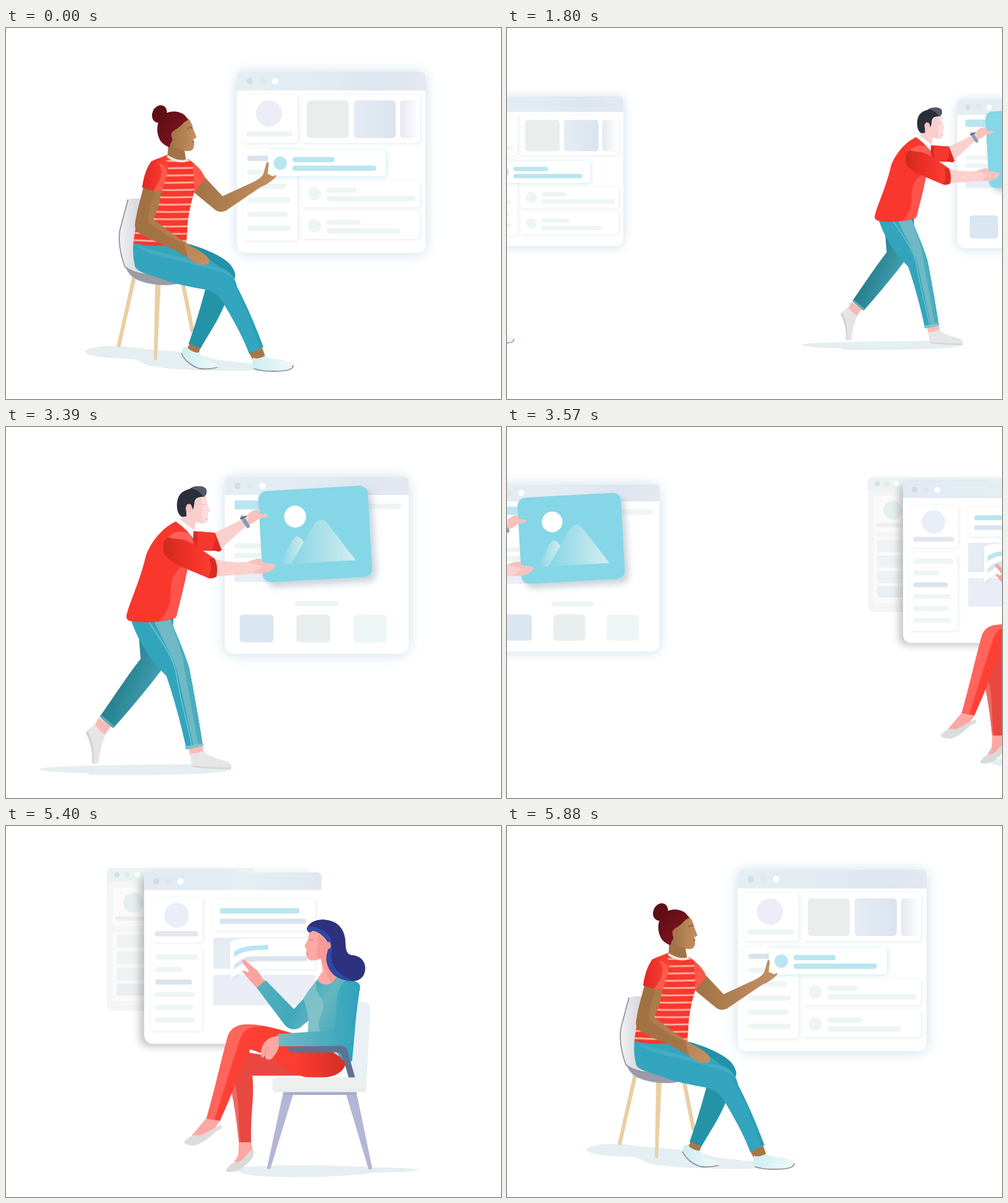
An HTML page that plays this animation: 800 by 600 pixels, repeating every 5.97 s.

```html
<!DOCTYPE html>
<html lang="en">
<head>
<meta charset="utf-8">
<title>Builders carousel</title>
<style>
html, body { margin: 0; width: 100%; height: 100%; overflow: hidden; background: #fff; }
svg { display: block; width: 800px; height: 600px; }
.bar { height: 8.5px; rx: 4px; fill: #edf6f4; }
.cyan { fill: #b8e6f0; }
.blue { fill: #d9e4ef; }
.card { fill: #fff; rx: 5px; filter: url(#soft); }
.tile { rx: 6px; }
.floor { fill: #e5eef1; }
.line { fill: none; stroke-linecap: round; stroke-linejoin: round; }
</style>
</head>
<body>
<svg viewBox="0 0 800 600">
<defs>
  <filter id="glow" x="-20%" y="-20%" width="140%" height="140%"><feDropShadow dx="0" dy="1" stdDeviation="11" flood-color="#c3d9e8" flood-opacity=".85"/></filter>
  <filter id="soft" x="-20%" y="-30%" width="140%" height="160%"><feDropShadow dx="1" dy="1" stdDeviation="2.4" flood-color="#8a9aa8" flood-opacity=".24"/></filter>
  <filter id="lift" x="-20%" y="-40%" width="140%" height="180%"><feDropShadow dx="1" dy="1" stdDeviation="3" flood-color="#7fd4e0" flood-opacity=".5"/></filter>
  <filter id="drop" x="-20%" y="-20%" width="150%" height="150%"><feDropShadow dx="7" dy="8" stdDeviation="6" flood-color="#6e8a9c" flood-opacity=".38"/></filter>
  <filter id="blur" x="-20%" y="-20%" width="140%" height="140%"><feGaussianBlur stdDeviation="7"/></filter>
  <linearGradient id="head"><stop stop-color="#e5eef2"/><stop offset=".5" stop-color="#e2ebf3"/><stop offset=".75" stop-color="#dde6f0"/><stop offset="1" stop-color="#e5e8f1"/></linearGradient>
  <linearGradient id="head3"><stop stop-color="#e2e9f4"/><stop offset=".6" stop-color="#e5eef3"/><stop offset="1" stop-color="#e0e7f1"/></linearGradient>
  <linearGradient id="tileB"><stop stop-color="#e6ecf4"/><stop offset="1" stop-color="#dae4ef"/></linearGradient>
  <linearGradient id="fade"><stop stop-color="#e5e8f0"/><stop offset="1" stop-color="#fff"/></linearGradient>
  <linearGradient id="hair1" x2="1" y2="1"><stop stop-color="#5c0c15"/><stop offset="1" stop-color="#861722"/></linearGradient>
  <linearGradient id="skin"><stop stop-color="#a17246"/><stop offset=".45" stop-color="#b18052"/><stop offset="1" stop-color="#c59165"/></linearGradient>
  <linearGradient id="hand" x2="1" y2="1"><stop stop-color="#a97849"/><stop offset=".6" stop-color="#b18052"/><stop offset="1" stop-color="#c59165"/></linearGradient>
  <linearGradient id="chair"><stop stop-color="#f2f2f4"/><stop offset=".5" stop-color="#d9d9de"/><stop offset="1" stop-color="#f0f0f3"/></linearGradient>
  <linearGradient id="sleeve"><stop stop-color="#e3261e"/><stop offset="1" stop-color="#ff4238"/></linearGradient>
  <linearGradient id="shoe"><stop stop-color="#cdeef2"/><stop offset="1" stop-color="#f0f8f9"/></linearGradient>
  <linearGradient id="backLeg" x1="0" y1=".3" x2=".75" y2=".75"><stop stop-color="#1f7382"/><stop offset=".5" stop-color="#2b8594"/><stop offset="1" stop-color="#44a4b4"/></linearGradient>
  <linearGradient id="knit"><stop stop-color="#cf2a20"/><stop offset=".4" stop-color="#ec3026"/><stop offset="1" stop-color="#ff4036"/></linearGradient>
  <linearGradient id="peak"><stop stop-color="#85d6e6"/><stop offset=".6" stop-color="#b5e3ea"/><stop offset="1" stop-color="#d2eef1"/></linearGradient>
  <linearGradient id="teal" gradientUnits="userSpaceOnUse" x1="412" x2="580" y1="250" y2="350"><stop stop-color="#55b1bd"/><stop offset=".4" stop-color="#3fa9bb"/><stop offset=".58" stop-color="#64b6bf"/><stop offset="1" stop-color="#2fa3bc"/></linearGradient>
  <linearGradient id="arm3"><stop stop-color="#72b9bf"/><stop offset="1" stop-color="#2fa3bc"/></linearGradient>
  <linearGradient id="thigh"><stop stop-color="#ff4338"/><stop offset=".65" stop-color="#fb3c31"/><stop offset="1" stop-color="#d32e25"/></linearGradient>
  <pattern id="stripes" patternUnits="userSpaceOnUse" x="200" y="208" width="130" height="11.8"><path d="M0 5Q65 9 130 5" class="line" stroke="#ffb9ab" stroke-width="2.8"/></pattern>
</defs>

<g class="scene">
  <g filter="url(#glow)">
    <path d="M373 101V79Q373 71 381 71H670Q678 71 678 79V348Q678 364 662 364H389Q373 364 373 348z" fill="#fff"/>
  </g>
  <path d="M373 101V79Q373 71 381 71H670Q678 71 678 79V101z" fill="url(#head)"/>
  <circle cx="394" cy="86" r="5.3" fill="#d2dfe7"/><circle cx="414.5" cy="86" r="5.3" fill="#e0e8ee"/><circle cx="435" cy="86" r="5.3" fill="#fff"/>
  <rect class="card" x="383" y="108" width="88" height="78"/>
  <circle cx="425" cy="138.5" r="21.3" fill="#ecedf7"/>
  <rect class="bar" x="388" y="167" width="75"/>
  <rect class="card" x="477" y="108" width="192" height="78"/>
  <rect class="tile" x="486" y="117" width="68" height="61" fill="#e9eeec"/>
  <rect class="tile" x="562" y="117" width="68" height="61" fill="url(#tileB)"/>
  <path d="M668 117H643Q637 117 637 123V172Q637 178 643 178H668z" fill="url(#fade)"/>
  <rect class="card" x="383" y="195" width="88" height="149"/>
  <rect class="bar blue" x="390" y="206.5" width="40"/>
  <rect class="bar" x="390" y="229" width="40"/><rect class="bar" x="390" y="251.5" width="63"/>
  <rect class="bar" x="390" y="274" width="69"/><rect class="bar" x="390" y="297" width="65"/><rect class="bar" x="390" y="319.5" width="69"/>
  <rect class="card" x="477" y="247" width="192" height="43"/>
  <rect class="card" x="477" y="297" width="192" height="44"/>
  <g fill="#edf6f4"><circle cx="498.5" cy="268" r="10.7"/><circle cx="498.5" cy="320" r="10.7"/></g>
  <rect class="bar" x="518" y="258" width="48"/><rect class="bar" x="518" y="272" width="144"/>
  <rect class="bar" x="518" y="310" width="55"/><rect class="bar" x="518" y="324" width="119"/>
  <rect x="423" y="197" width="191" height="43" rx="5" fill="#fff" filter="url(#lift)"/>
  <circle class="cyan" cx="443.3" cy="218.5" r="10.8"/>
  <rect class="bar cyan" x="463" y="208.5" width="68"/><rect class="bar cyan" x="463" y="222.5" width="135"/>

  <path class="floor" d="M128 523C135 513 180 512 215 518C245 522 290 520 330 534C370 542 420 542 440 549C430 557 300 556 250 549C215 545 222 537 200 535C160 534 130 531 128 523z"/>
  <g fill="#e9cfa2">
    <path d="M204 402L210 405L185 515Q182 518 179 514z"/><path d="M241 414H250L244 536Q241 539 239 535z"/><path d="M283 414L290 416L304 488L299 494z"/>
  </g>
  <path d="M193 386C215 398 255 394 288 410C275 417 245 418 222 411C207 406 198 400 193 386z" fill="#9b9ba7"/>
  <path d="M196 279Q198 276 203 276L226 275L222 360L240 398C222 399 207 397 193 387C184 365 181 345 184 329z" fill="url(#chair)"/>
  <path class="line" d="M197 278L184 327C181 347 185 366 192 386C207 397 225 400 238 398" stroke="#94959f" stroke-width="1.8"/>

  <path d="M290 348C315 354 350 368 363 383C371 394 372 401 369 406L330 396z" fill="#2391a6"/>
  <path d="M325 412L358 436L353 448C341 477 326 497 314 519L295 511C306 480 315 450 325 412z" fill="#2493a8"/>
  <path d="M297 511L314 518L311 527L292 519z" fill="#aa7646"/>
  <path d="M292 515C296 522 308 527 313 524C316 535 331 538 341 544C345 549 339 551 333 551C316 553 306 550 298 544C288 536 285 529 284 522C286 517 289 515 292 515z" fill="url(#shoe)"/>
  <path class="line" d="M284 527C289 538 300 547 312 550.500Q326 553 341 549" stroke="#8d9099" stroke-width="1.800"/>
  <path d="M393 526L414 517L419 531L399 537z" fill="#aa7646"/>
  <path d="M399 533C405 536 414 534 418 530C428 537 446 534 459 540C466 544 465 549 460 551C446 557 420 557 404 553C396 549 398 540 399 533z" fill="url(#shoe)"/>
  <path class="line" d="M401 551C418 557 447 556 459 552Q464 550 464 546" stroke="#8d9099" stroke-width="1.800"/>
  <path d="M206 346C235 354 268 354 291 349C310 362 330 373 345 386C363 392 370 403 374 420C392 455 405 487 416 516L393 527C383 500 367 471 353 448C345 433 337 427 322 423C295 418 272 414 255 407C232 398 216 397 209 387C205 372 205 358 206 346z" fill="#33a5be"/>
  <path d="M207 350C240 362 280 368 312 380C345 388 363 392 369 407C350 390 325 390 298 381C268 372 233 370 207 350z" fill="#55b3c5" opacity=".55"/>
  <path d="M360 400C384 440 398 480 410 518L416 516C405 487 391 452 374 420z" fill="#239bb6" opacity=".6"/>

  <path d="M262 190L261 210C270 219 283 219 291 212L288 196L276 184z" fill="#a27247"/>
  <path d="M293 145C298 150 301 155 302 162L308 177L303 180L304 188C304 195 301 199 295 199C284 199 273 194 267 188L266 172L278 158z" fill="url(#skin)"/>
  <path d="M301 184L305 183L303 186z" fill="#923f36"/>
  <path class="line" d="M293 163Q297 159 301 162" stroke="#8c5433" stroke-width="1.300"/>
  <path d="M294 149C290 137 273 131 258 138C244 146 242 165 247 177C250 186 257 190 264 193L269 181C266 173 269 166 276 163C284 158 286 152 294 149z" fill="url(#hair1)"/>
  <ellipse cx="248" cy="139" rx="11.5" ry="14.5" transform="rotate(25 248 139)" fill="#620e17"/>
  <ellipse cx="271" cy="173" rx="3.8" ry="6" fill="#a97548"/>

  <path d="M304 266L322 242L350 272L400 249C408 245 413 241 416 236L421 218C423 214 426 218 424 225L423 236L432 240C437 236 439 239 434 243C426 250 420 254 412 257L356 295C350 298 343 298 338 294z" fill="url(#skin)"/>
  <path d="M261 205C272 216 286 216 294 212C306 219 316 231 322 243L304 266C298 285 293 310 293 330L291 349C268 355 230 353 206 348C208 322 217 295 230 262L234 216z" fill="#f8382d"/>
  <path d="M261 205C272 216 286 216 294 212L304 222V266C298 285 293 310 293 330L291 349C268 355 230 353 206 348C208 322 217 295 230 262L248 212z" fill="url(#stripes)"/>
  <path d="M302 219C314 226 319 236 322 243L304 266V250z" fill="#ff574c"/>
  <path class="line" d="M262 208C272 215 284 217 292 214" stroke="#f0e3dc" stroke-width="4"/>
  <path d="M222 258L251 263C249 285 243 300 238 309C255 322 275 338 290 347C305 357 326 365 329 377C329 384 318 384 310 382L288 368C265 353 235 344 214 331C207 326 208 318 210 308C213 290 218 275 222 258z" fill="url(#hand)"/>
  <path d="M222 258L240 261C236 285 227 299 230 314C245 325 267 341 288 348L294 371L288 368C265 353 235 344 214 331C207 326 208 318 210 308C213 290 218 275 222 258z" fill="#9b6b3f" opacity=".6"/>
  <path d="M259 211C263 223 262 230 260 238L252 264C240 264 230 261 220 258C222 243 226 228 234 217C242 211 250 209 259 211z" fill="url(#sleeve)"/>
  <path d="M246 218C254 220 261 225 260 238L252 264L238 263C250 247 257 232 246 218z" fill="#ff5c50"/>
</g>

<g class="scene">
  <rect x="363" y="77" width="302" height="291" rx="15" fill="#fff" filter="url(#glow)"/>
  <path d="M363 107V85Q363 77 371 77H657Q665 77 665 85V107z" fill="url(#head)"/>
  <circle cx="384" cy="92" r="5.3" fill="#d2dfe7"/><circle cx="404" cy="92" r="5.3" fill="#e0e8ee"/><circle cx="425" cy="92" r="5.3" fill="#fff"/>
  <rect class="cyan" x="379" y="116" width="60" height="14.5" rx="3"/>
  <rect class="bar" x="580" y="121" width="73"/>
  <rect class="bar" x="379" y="186.5" width="60"/><rect class="bar" x="379" y="202" width="60"/>
  <rect x="379" y="235" width="60" height="15" rx="3" fill="#e9edf6"/>
  <rect class="bar" x="477.5" y="281" width="73.5"/>
  <rect class="tile" x="387.5" y="303.5" width="55.5" height="45.5" fill="#dae6f0"/>
  <rect class="tile" x="480.5" y="303.5" width="55.5" height="45.5" fill="#e7eeed"/>
  <rect class="tile" x="573.5" y="303.5" width="55.5" height="45.5" fill="#eef7f6"/>

  <path class="floor" d="M58 557C80 551 200 551 310 549C340 552 372 553 374 558C362 566 250 568 140 567Q136 565 142 564C100 564 62 561 58 557z"/>
  <path d="M156 473L176 487L166 502L149 486z" fill="#f5bab6"/>
  <path d="M150 483C155 491 160 497 168 500C160 515 158 533 156 546C152 551 145 550 145 546C147 526 141 510 135 498C137 492 143 490 150 483z" fill="#e5e5e5"/>
  <path d="M135 498L138 494C147 512 150 530 147 548L145 546C147 526 141 510 135 498z" fill="#d3d3d3"/>
  <path d="M222 340L279 308L278 325C272 365 264 388 258 396C232 430 205 462 180 490L158 471C180 440 200 408 225 376z" fill="url(#backLeg)"/>
  <path class="line" d="M161 472L179 487" stroke="#62a9b3" stroke-width="4.5" stroke-linecap="butt"/>
  <path d="M304 523L327 519L329 532L306 535z" fill="#f9bdb9"/>
  <path d="M307 531C315 534 322 529 328 527C335 536 350 540 368 545C375 549 376 554 372 557C350 558 325 557 310 554C307 546 307 538 307 531z" fill="#e6e6e6"/>
  <path class="line" d="M311 553Q340 556 372 556" stroke="#d3d3d3" stroke-width="2.5"/>
  <path d="M209 312L273 309C285 340 298 368 305 393C313 435 322 485 327 519L300 525C292 485 278 435 267 404C240 377 222 350 209 312z" fill="#32a5bd"/>
  <path d="M247 314L273 309C285 340 298 368 305 393C313 435 322 485 327 519L312 522C304 488 296 445 288 412C284 380 262 350 247 314z" fill="#6eb9c4"/>
  <path d="M273 312C286 345 294 368 297 393C304 435 314 485 320 520L327 519C322 485 313 435 305 393C299 370 285 340 273 312z" fill="#4aadbf"/>
  <path class="line" d="M238 315C262 352 281 375 285 410C292 450 303 488 309 520" stroke="#7cc5d1" stroke-width="1.5"/>
  <path class="line" d="M300 522L326 517" stroke="#82c3cc" stroke-width="4.5" stroke-linecap="butt"/>

  <path d="M313 114C320 108 327 110 333 107L334 122L339 133L335 137C336 147 335 154 328 154L315 151L313 166L288 147L299 141L302 121z" fill="#fbdddb"/>
  <path d="M315 114L324 111C329 124 323 140 327 154L315 151L313 165L289 147L302 138L312 125z" fill="#f8c8c5" opacity=".65"/>
  <path d="M285 130C283 110 290 101 305 97C313 91 328 91 332 97C335 103 332 108 328 110C318 110 313 112 313 122L311 131L307 122L300 128V142L293 143C288 140 286 136 285 130z" fill="#2a303a"/>
  <path d="M308 96C318 91 330 92 333 98C334 104 332 108 327 110C324 102 316 98 308 96z" fill="#555767"/>
  <ellipse cx="304" cy="129" rx="5" ry="7.5" fill="#f7c3c0"/>
  <path class="line" d="M326 123L333 122M331 147L335 146" stroke="#eeb5b0" stroke-width="1.2"/>

  <path d="M308 166L346 169C352 170 355 186 358 196C357 200 353 201 349 199L306 197z" fill="#dc2b22"/>
  <path d="M318 167L346 169C350 176 348 190 340 199L318 198z" fill="#f5372d"/>
  <path d="M284 150C260 160 242 185 234 205C225 245 208 280 202 303C200 311 204 314 213 315C240 318 262 315 278 310Q283 309 284 304C290 280 298 250 303 222L314 185C305 167 295 158 284 150z" fill="#fa372d"/>
  <path d="M303 220L284 304Q283 309 278 310L255 314C282 290 270 262 278 242Q286 225 303 220z" fill="#ff544b"/>
  <path d="M283 151L289 146L312 164L311 178C302 166 293 158 283 151z" fill="#f7f9fb"/>

  <g filter="url(#drop)"><rect x="421.5" y="96" width="180" height="150" rx="14" transform="rotate(-3.2 511.5 171)" fill="#85d6e6"/></g>
  <circle cx="478.5" cy="142.5" r="18" fill="#fff"/>
  <path d="M453 222L474 181Q481 170 489 179L495 187L472 220z" fill="url(#peak)"/>
  <path d="M472 220L511 153Q521 142 531 153L578 214z" fill="url(#peak)"/>

  <path d="M347 169L390 148L402 137C410 131 417 130 420 132V138L434 139C435 144 426 144 418 146C412 153 405 155 399 157L357 195z" fill="#fad0cd"/>
  <path d="M402 138C410 131 417 130 420 132V138L434 139C435 144 426 144 418 146C412 153 406 154 401 155z" fill="#f7c2be"/>
  <path class="line" d="M392 144L401 158" stroke="#8b9cb5" stroke-width="6.5" stroke-linecap="butt"/>
  <path class="line" d="M389 146L398 142" stroke="#4d5970" stroke-width="2"/>
  <path d="M343 212C370 218 390 219 405 216C413 212 420 210 424 213L425 218L446 221C446 226 442 228 440 230C432 237 420 236 410 236C390 238 370 239 346 241z" fill="#fbd0cd"/>
  <path d="M400 217C413 212 420 210 424 213L425 218L446 221C446 226 442 228 440 230C432 237 420 236 408 236Q420 230 424 224z" fill="#f7c2be"/>
  <path d="M264 182C275 168 295 172 312 188L346 211C352 222 351 235 349 241C344 244 340 244 335 243C310 232 275 220 264 205C261 195 262 188 264 182z" fill="url(#knit)"/>
  <path d="M337 211L346 211C352 222 351 235 349 241C344 244 340 244 335 243C342 232 341 220 337 211z" fill="#d92d24"/>
  <path d="M270 176C283 163 305 164 310 178Q311 184 311 188C297 177 283 181 270 176z" fill="#ff6158"/>
</g>

<g class="scene">
  <rect x="172" y="67" width="330" height="45" rx="8" fill="#dfe3e6" opacity=".45" filter="url(#blur)"/>
  <rect x="167" y="65" width="243" height="234" rx="9" fill="#f5f5f5"/>
  <path d="M167 87V74Q167 65 176 65H401Q410 65 410 74V87z" fill="#eaf3f2"/>
  <circle cx="183.5" cy="76" r="4.3" fill="#d4dee9"/><circle cx="200" cy="76" r="4.3" fill="#e0eaec"/><circle cx="217" cy="76" r="4.3" fill="#fff"/>
  <g fill="#fafafa"><rect x="177" y="97" width="70" height="63" rx="4"/><rect x="177" y="169" width="70" height="114" rx="4"/></g>
  <circle cx="210.5" cy="122" r="16.5" fill="#e6eff0"/>
  <rect x="181" y="144.5" width="60" height="7" rx="3" fill="#eeeeef"/>
  <g fill="#eff2f2"><rect x="183" y="174" width="60" height="21" rx="3"/><rect x="183" y="201" width="60" height="21" rx="3"/><rect x="183" y="228" width="60" height="21" rx="3"/><rect x="183" y="254" width="60" height="20" rx="3" fill="#e9eef3"/></g>
  <rect x="221" y="78" width="165" height="279" rx="14" opacity=".24" filter="url(#blur)"/>
  <path d="M228 101V80Q228 72 236 72H510Q518 72 518 80V353H244Q228 353 228 337z" fill="#fff"/>
  <path d="M228 101V80Q228 72 236 72H511Q518 72 518 80V101z" fill="url(#head3)"/>
  <circle cx="248" cy="87" r="5.2" fill="#d1dbe8"/><circle cx="267.5" cy="87" r="5.2" fill="#e0e7ec"/><circle cx="287.5" cy="87" r="5.2" fill="#fff"/>
  <rect class="card" x="241" y="113" width="83" height="74"/>
  <circle cx="281" cy="142.5" r="20.3" fill="#e9eef7"/>
  <rect class="bar" x="245.5" y="168.5" width="71" style="fill:#e4e5ee"/>
  <rect class="card" x="239" y="196" width="84" height="136"/>
  <rect class="bar" x="246" y="206.5" width="70"/><rect class="bar" x="246" y="227" width="44"/><rect class="bar blue" x="246" y="247.5" width="60"/>
  <rect class="bar" x="246" y="268" width="65"/><rect class="bar" x="246" y="289" width="62"/><rect class="bar" x="246" y="309.5" width="65"/>
  <rect class="card" x="341" y="116" width="167" height="52" style="rx:2px"/>
  <rect class="bar cyan" x="352" y="131" width="130" style="rx:2px"/><rect class="bar blue" x="352" y="148" width="141" style="rx:2px"/>
  <rect x="341" y="179" width="167" height="51" rx="2" fill="#e6ecf4"/>
  <rect x="341" y="240" width="167" height="50" rx="2" fill="#eaedf5"/>
  <path d="M368 187C378 179 400 180 420 180H508V231H405C388 232 378 239 370 248C367 228 370 205 368 187z" fill="#fff" filter="url(#soft)"/>
  <path class="cyan" d="M375 202C386 194 400 192 431 191V199C403 199 389 201 375 211z"/>
  <path class="blue" d="M375 224C388 210 402 209 420 209.5H495V217.5H425C400 217 386 221 375 232z"/>

  <path class="floor" d="M376 556C430 550 560 552 605 555C640 556 670 556 678 559C660 564 620 562 600 564C570 570 480 573 430 570C400 568 380 566 376 556z"/>
  <path d="M578 283L591 285Q598 288 598 297L592 410H560z" fill="#e9f0f6"/>
  <path d="M383 512H403L406 528L390 549L374 549L382 535z" fill="#fba8a3"/>
  <path d="M362 560C366 552 375 545 383 546C392 542 398 530 406 525C409 532 407 538 402 544C395 550 388 560 375 562C368 563 361 563 362 560z" fill="#dadad8"/>
  <path d="M370 425L398 367L475 380L494 405H405C409 440 402 460 403 514H383C380 480 375 450 370 425z" fill="#e8483f"/>
  <path d="M370 425L375 414C386 446 380 480 386 514H383C380 480 375 450 370 425z" fill="#f06a61"/>
  <path d="M331 473L353 478L344 491L316 506L306 503z" fill="#fba8a3"/>
  <path d="M293 514C300 505 310 500 318 503C330 501 340 490 354 486C357 490 353 494 346 496C336 505 325 515 312 519C303 520 296 518 293 514z" fill="#dcdcda"/>
  <path d="M330 475C343 430 354 380 365 340C370 326 382 321 398 321C425 322 445 328 468 335L494 338L530 362L559 381C556 397 545 404 530 407C515 409 500 408 490 407C465 402 440 372 401 362C398 378 390 388 383 405C373 430 363 455 352 479z" fill="url(#thigh)"/>
  <path d="M330 475C343 430 354 380 365 340C370 326 382 321 398 321C412 321 424 324 434 326C405 322 392 326 385 345C368 395 355 440 343 477z" fill="#ff655d"/>

  <path d="M498 170C512 164 524 178 531 186C535 190 534 198 527 199V215L543 242L537 254C526 262 514 256 510 249L520 234L517 213Q507 218 499 216C493 213 493 205 493 197L490 193L496 182z" fill="#fcaaa5"/>
  <path d="M513 174L527 186C534 189 534 198 527 199V215L543 242L533 252L518 215C503 213 514 195 513 174z" fill="#f58c89" opacity=".5"/>
  <path class="line" d="M498 184Q502 181 505 184M493 206L497 206" stroke="#e17775" stroke-width="1.2"/>
  <path d="M412 261L399 247L390 236C388 232 391 231 396 236L400 234L389 220C387 215 391 214 395 218L412 232C418 238 420 245 426 251z" fill="#fba39f"/>
  <path d="M511 248C498 264 494 271 489 279L473 296L427 249L412 261L458 322C466 331 475 330 482 327L497 315L496 337L533 355L552 379L568 382C572 350 574 300 581 262C580 252 572 249 560 249L542 243C535 259 520 260 511 248z" fill="url(#teal)"/>
  <path d="M511 248C498 264 492 272 488 279C492 290 497 300 498 337H518C502 310 535 295 515 275Q506 262 511 248z" fill="#8dc6ca" opacity=".75"/>
  <path d="M581 260C582 251 568 248 559 249C545 256 543 275 542 305C542 322 540 329 529 331L447 337V357H533C558 355 571 340 574 310z" fill="url(#arm3)"/>
  <path d="M494 164C498 153 512 148 525 150C545 152 555 165 557 182C558 196 557 207 570 208C585 210 592 222 589 235C586 249 572 253 558 249C540 245 529 235 526 215C526 205 531 195 528 186C520 173 510 168 503 168C499 173 495 170 494 164z" fill="#2d317e"/>
  <path d="M494 164C500 157 508 162 518 166C536 174 537 190 534 206C533 228 550 242 570 250C545 249 528 236 526 215C526 205 531 195 528 186C520 173 510 168 503 168C499 173 495 170 494 164z" fill="#3048a5"/>
  <ellipse cx="529.5" cy="192" rx="3.8" ry="6" fill="#f99c99"/>
  <path d="M462 358L549 356Q557 356 560 362L573 408L563 409L551 370Q549 367 545 367H472Q464 366 462 358z" fill="#607190"/>
  <path d="M448 340C436 340 425 347 421 358C417 370 420 376 422 376L426 372C426 380 434 380 437 377C444 370 449 360 448 355z" fill="#fba9a4"/>
  <path class="line" d="M426 372Q426 363 432 357" stroke="#ef8985" stroke-width="1.2"/>
  <g fill="#b4b6d6"><path d="M456 430L473 431L435 556Q432 560 429 556z"/><path d="M558 434L575 431L601 556Q599 561 595 558z"/><rect x="457" y="430" width="118" height="6.5" fill="#a5a8cc"/></g>
  <rect x="438" y="408" width="154" height="24" rx="6" fill="#e8eeee"/>
  <path d="M444 408H586Q592 408 592 414V427H438V414Q438 408 444 408z" fill="#ecf0ef"/>
</g>
</svg>
<script>
const LOOP = 5970, STEP = 30;
// start of each slide, its number of steps and how far the scenes shrink midway
const slides = [
  { at: 1590, steps: 15, dip: 0.175 },
  { at: 3390, steps: 14, dip: 0.07 },
  { at: 5400, steps: 17, dip: 0.065 }
];
const scenes = [...document.querySelectorAll('.scene')];

function place(scene, x, scale) {
  scene.style.display = '';
  scene.setAttribute('transform', `translate(${400 + x} 300) scale(${scale}) translate(-400 -300)`);
}

function draw(now) {
  const t = now % LOOP;
  let current = 0, slide = null, u = 0;
  slides.forEach((s, i) => {
    if (t < s.at) return;
    const n = Math.floor((t - s.at) / STEP) + 1;
    current = n < s.steps ? i : (i + 1) % 3;
    slide = n < s.steps ? s : null;
    u = n / s.steps;
  });
  scenes.forEach(s => s.style.display = 'none');
  if (slide) {
    const shift = 400 * (1 - Math.cos(Math.PI * u));
    const scale = 1 - slide.dip * Math.sin(Math.PI * u);
    place(scenes[current], -shift, scale);
    place(scenes[(current + 1) % 3], 800 - shift, scale);
  } else {
    place(scenes[current], 0, 1);
  }
}

function tick() {
  draw(performance.now());
  requestAnimationFrame(tick);
}
tick();
</script>
</body>
</html>
```
